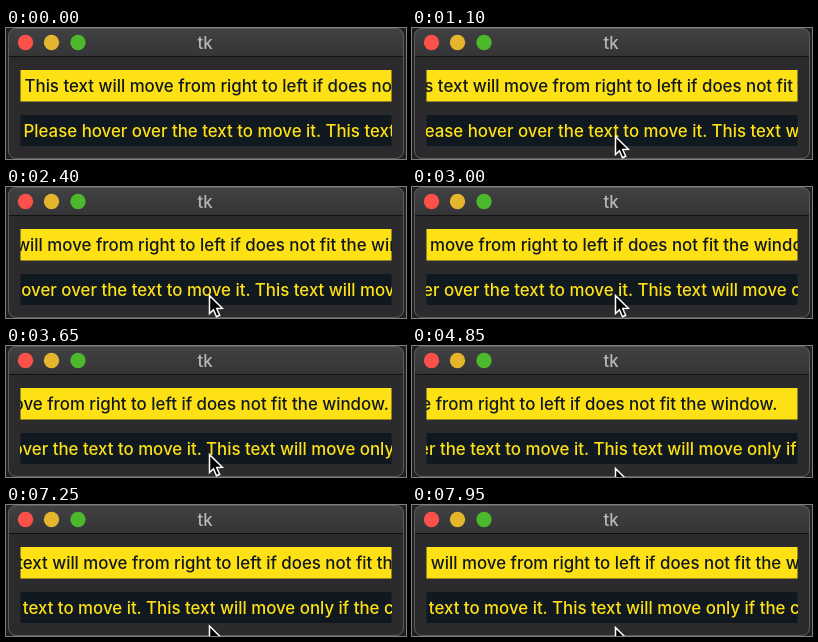
Write an HTML page that moves like this. It is 400 px wide and 131 px high and loops after 8000 ms.

```html
<!DOCTYPE html>
<html lang="en">
<head>
<meta charset="utf-8">
<title>tk</title>
<style>
  html, body { margin: 0; width: 100%; height: 100%; overflow: hidden; background: #202022; }
  svg { display: block; width: 100%; height: 100%; }
  text { font: 500 16.85px Inter, "Liberation Sans", sans-serif; white-space: pre; }
</style>
</head>
<body>
<svg viewBox="0 0 400 131">
  <defs>
    <linearGradient id="bar" x2="0" y2="1">
      <stop stop-color="#414143"/>
      <stop offset="1" stop-color="#353537"/>
    </linearGradient>
    <clipPath id="window"><rect x="2" width="396" height="131" rx="8"/></clipPath>
    <clipPath id="labels"><rect x="14" y="30" width="372" height="101"/></clipPath>
  </defs>

  <g clip-path="url(#window)">
    <rect width="400" height="131" fill="#2b2b2d"/>
    <rect width="400" height="28" fill="url(#bar)"/>
    <rect y="28" width="400" height="1" fill="#111"/>
  </g>
  <rect x="2.5" y=".5" width="395" height="130" rx="7.5" fill="none" stroke="#5c5c5e"/>
  <circle cx="19.5" cy="14.5" r="7.7" fill="#fc5148"/>
  <circle cx="45.5" cy="14.5" r="7.7" fill="#e4b52d"/>
  <circle cx="72" cy="14.5" r="7.7" fill="#4bb92b"/>
  <text x="199" y="21" text-anchor="middle" fill="#b6b6b7">tk</text>

  <rect x="14.5" y="42" width="371" height="31.5" fill="#fee115"/>
  <rect x="14.5" y="87" width="371" height="31" fill="#101820"/>
  <g clip-path="url(#labels)">
    <text id="auto" x="18.5" y="64" fill="#101820">This text will move from right to left if does not fit the window.</text>
    <text id="hover" x="17.5" y="108.5" fill="#fee115">Please hover over the text to move it. This text will move only if the cursor is over it.</text>
  </g>

  <path id="cursor" d="M0 0V18L4 14.2L7 21.2L10.2 19.8L7.2 13L12.8 12.8Z"
        fill="#000" stroke="#fff" stroke-width="1.5"/>
</svg>

<script>
const LOOP = 8000, STEP = 50;      // ms
const SPEED = 0.039;               // px per ms, both labels
const TRAVEL = 148.5, PAUSE = 983; // the upper label rests at both ends
const CYCLE = 2 * PAUSE + TRAVEL / SPEED;
const CYCLE_START = -693;

// Times at which the cursor is over the lower label.
const visits = [{ enter: 590, leave: 4130 }, { enter: 6140, leave: 7200 }];

const clamp = (value, low, high) => Math.min(high, Math.max(low, value));

function autoShift(time) {
  const phase = (time - CYCLE_START) % CYCLE;
  return clamp((phase - PAUSE) * SPEED, 0, TRAVEL);
}

function hoverShift(time) {
  return visits.reduce((sum, { enter, leave }) => sum + SPEED * (clamp(time, enter, leave) - enter), 0);
}

// The cursor crosses the label's lower edge at the start and end of each visit.
function cursorY(time) {
  const inside = Math.max(...visits.map(({ enter, leave }) => Math.min(time - enter, leave - time)));
  const lowest = time < visits[0].enter ? 133 : 122.5;
  return clamp(118 - inside * 0.06, 108.5, lowest);
}

function move(id, x, y) {
  document.getElementById(id).setAttribute("transform", `translate(${x} ${y})`);
}

function draw() {
  const time = Math.floor(performance.now() % LOOP / STEP) * STEP;
  move("auto", -autoShift(time), 0);
  move("hover", -hoverShift(time), 0);
  move("cursor", 203.5, cursorY(time));
  requestAnimationFrame(draw);
}
draw();
</script>
</body>
</html>
```
